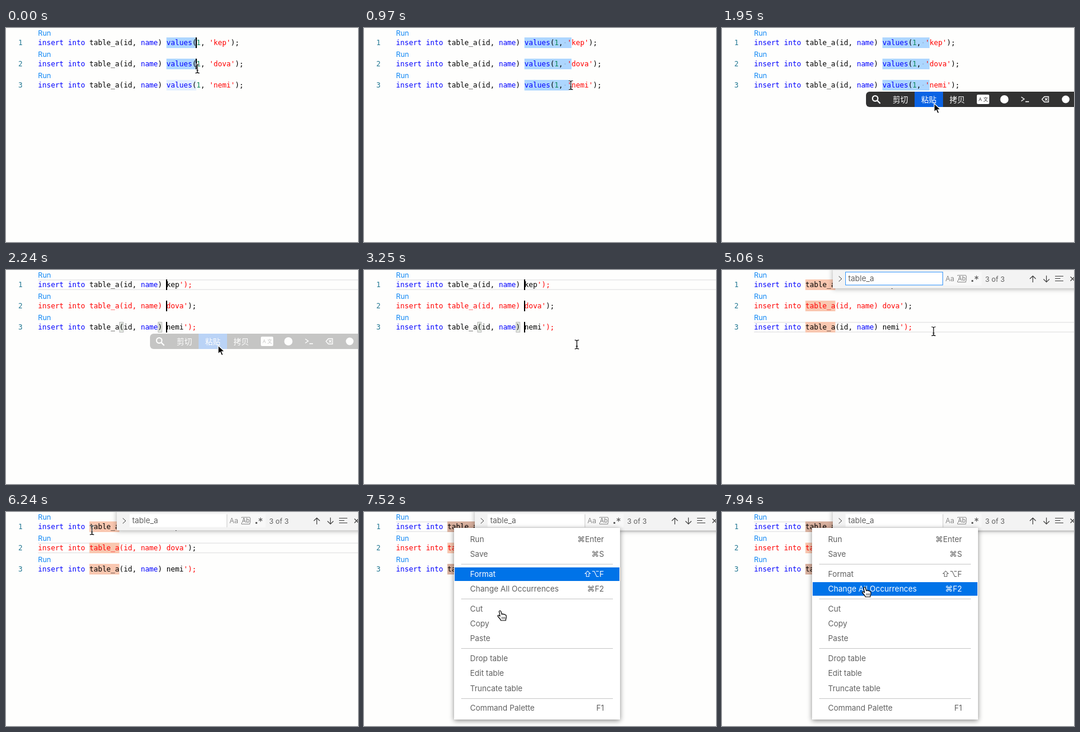
An HTML page for the animation above (8 s loop, 594x363 px).

```html
<!DOCTYPE html>
<html lang="en">
<head>
<meta charset="utf-8">
<title>Column editing in a SQL file</title>
<style>
  html, body { margin: 0; width: 100%; height: 100%; overflow: hidden; background: #fefefd; }
  svg { display: block; width: 594px; height: 363px; }
  text { white-space: pre; font: 13px Inter, 'DejaVu Sans', sans-serif; }
  .code { font: 12px 'DejaVu Sans Mono', monospace; }
  .small { font-size: 12px; }
  .cjk { font: 13px 'Noto Sans CJK SC', 'Noto Sans CJK', sans-serif; }
  .find { filter: drop-shadow(0 1px 4px #0005); }
  .menu { filter: drop-shadow(0 2px 4px #0007); }
</style>
</head>
<body>
<svg id="stage" viewBox="0 0 594 363"></svg>
<script>
const LOOP = 8000, LEFT = 54, CHAR = 7.224;
const BLUE = '#0000ff', RED = '#ff0000', GREEN = '#098658', BLACK = '#000';
const NAMES = ['kep', 'dova', 'nemi'];
const stage = document.getElementById('stage');

// Moments of the story, in ms.
const BAR_IN = 1290, CUT = 2190, CLICK_END = 4080, FIND = 4640,
      CLICK_ROW2 = 5750, CLICK_ROW1 = 6860, MENU = 7130, HOVER_LAG = 170;

// Pointer stops: time, x, y
const PATH = [
  [0, 323, 69], [470, 346, 97], [700, 346, 97], [740, 347, 97], [880, 347, 97], [910, 349, 97],
  [1290, 349, 97], [1440, 358, 128], [3160, 358, 128], [3370, 361, 124], [3550, 361, 124],
  [3800, 490, 265], [4130, 359, 104], [4800, 359, 104], [4910, 357, 104], [5060, 357, 104],
  [5720, 318, 61], [5890, 318, 61], [6230, 145, 31], [6330, 145, 31], [6630, 151, 27],
  [7130, 151, 27], [7520, 229, 167], [7600, 229, 167], [7800, 241, 126], [7910, 241, 126],
  [7940, 240, 127], [8000, 240, 127]
];

// Times at which the text caret is lit
const CARET_ON = [[0, 970], [1440, 1950], [CUT, 2680], [3160, 3660], [CLICK_END, 4580],
                  [CLICK_ROW2, 6230], [CLICK_ROW1, MENU]];

// Menu entries: centre y, label, shortcut
const ITEMS = [
  [46, 'Run', '⌘Enter'], [71, 'Save', '⌘S'],
  [105, 'Format', '⇧⌥F'], [130, 'Change All Occurrences', '⌘F2'],
  [164, 'Cut', ''], [189, 'Copy', ''], [214, 'Paste', ''],
  [248, 'Drop table', ''], [273, 'Edit table', ''], [299, 'Truncate table', ''],
  [332, 'Command Palette', 'F1']
];

const clamp = v => Math.min(1, Math.max(0, v));
const smooth = v => v * v * (3 - 2 * v);
const colX = col => LEFT + col * CHAR;
const rowY = row => 16 + row * 36;

const rect = (x, y, w, h, fill, extra = '') =>
  `<rect x="${x}" y="${y}" width="${w}" height="${h}" fill="${fill}" ${extra}/>`;
const text = (x, y, str, fill, cls = '', anchor = 'start') =>
  `<text x="${x}" y="${y}" fill="${fill}" class="${cls}" text-anchor="${anchor}">${str}</text>`;
const line = (d, color, width = 1) =>
  `<path d="${d}" fill="none" stroke="${color}" stroke-width="${width}"/>`;
const span = (row, from, to, fill) =>
  rect(colX(from), rowY(row), (to - from) * CHAR, 18, fill);

function pointer(t) {
  const i = Math.max(1, PATH.findIndex(p => p[0] >= t));
  const [t0, x0, y0] = PATH[i - 1], [t1, x1, y1] = PATH[i];
  const k = smooth(clamp((t - t0) / (t1 - t0)));
  return { x: x0 + (x1 - x0) * k, y: y0 + (y1 - y0) * k };
}

function tokens(row, cut) {
  const name = NAMES[row];
  if (cut && row === 1) return [[RED, `insert into table_a(id, name) ${name}'`], [BLACK, ');']];
  const head = [[BLUE, 'insert into'], [BLACK, ' table_a(id, '], [BLUE, 'name'], [BLACK, ') ']];
  return head.concat(cut
    ? [[BLACK, name], [RED, "');"]]
    : [[BLUE, 'values'], [BLACK, '('], [GREEN, '1'], [BLACK, ', '], [RED, `'${name}'`], [BLACK, ');']]);
}

function codeRow(row, cut) {
  const y = rowY(row);
  const parts = tokens(row, cut).map(([c, s]) => `<tspan fill="${c}">${s}</tspan>`).join('');
  return text(LEFT, y - 3.5, 'Run', '#0f87f5', 'small') +
    text(28, y + 13, row + 1, '#237893', 'code', 'end') +
    text(LEFT, y + 13, parts, BLACK, 'code');
}

function currentLine(row) {
  const y = rowY(row);
  return rect(LEFT, y, 540, 1.5, '#e8e8e8') + rect(LEFT, y + 16.5, 540, 1.5, '#e8e8e8');
}

function caret(row, col) {
  return rect(Math.round(colX(col)) - 1, rowY(row), 2, 18, BLACK);
}

function editor(t, mouse) {
  const cut = t >= CUT;
  const lit = CARET_ON.some(([a, b]) => t >= a && t < b);
  let under = '', over = '';
  if (!cut) {
    const grip = t < BAR_IN ? mouse : { x: 349, y: 97 };
    const col = Math.round((grip.x - LEFT) / CHAR), rows = grip.y > 79 ? 3 : 2;
    for (let r = 0; r < 3; r++) {
      const picked = r < rows;
      under += span(r, 30, picked ? col : 37, picked ? '#add6ff' : '#e4f0ff');
      if (picked && col >= 40) under += text(colX(39), rowY(r) + 13, '·', '#3333', 'code');
      if (picked && lit) over += caret(r, col);
    }
  } else if (t < CLICK_END) {
    under += currentLine(0);
    for (const col of [19, 28])
      under += rect(colX(col) + .5, 88.5, CHAR - 1, 17, '#e6ebe4', 'stroke="#b9b9b9"');
    if (lit) for (let r = 0; r < 3; r++) over += caret(r, 30);
  } else {
    const [row, col] = t < CLICK_ROW2 ? [2, 37] : t < CLICK_ROW1 ? [1, 37] : [0, 13];
    under += currentLine(row);
    if (lit) over += caret(row, col);
  }
  if (t >= FIND + 60) {
    for (let r = 0; r < 3; r++) {
      under += span(r, 12, 19, '#f9c7b0');
      if (t >= CLICK_ROW1 + 60 && r !== 1) under += span(r, 12, 19, '#57575733');
    }
  }
  return under + [0, 1, 2].map(r => codeRow(r, cut)).join('') + over;
}

function toolbar(t) {
  const alpha = t < 2000 ? clamp((t - BAR_IN) / 150) : clamp((2270 - t) / 110);
  if (!alpha) return '';
  const white = '#fff';
  return `<g opacity="${alpha}">` +
    rect(243, 108, 370, 26, '#323232', 'rx="6"') + rect(325, 108, 48, 26, '#0a63e4') +
    `<circle cx="258.500" cy="119.500" r="4.500" fill="none" stroke="#fff" stroke-width="2"/>` +
    line('M262 123l5 5', white, 2.2) +
    text(288, 126, '剪切', white, 'cjk') + text(336, 126, '粘贴', white, 'cjk') +
    text(384, 126, '拷贝', white, 'cjk') +
    rect(430, 113, 21, 16, white, 'rx="2"') +
    `<g style="font-size:8px">` +
    `<text x="433" y="124" style="font-size:8px" fill="#323232">A</text>` +
    `<text x="441" y="124" class="cjk" style="font-size:8px" fill="#323232">文</text></g>` +
    `<circle cx="476.500" cy="121" r="7" fill="#fff"/>` +
    line('M505 117l5 3.500l-5 3.500M512 125h6', white, 1.3) +
    line('M540 121l4-4.500h7v9h-7zM545 119l4 4M549 119l-4 4', white, 1.3) +
    `<circle cx="580" cy="121" r="6.500" fill="#fff"/></g>`;
}

function findWidget(t) {
  if (t < FIND) return '';
  const drop = -38 * (1 - clamp((t - FIND) / 200)), ink = '#424242', dim = '#8c8c8c';
  const focus = t < CLICK_ROW2 ? 'stroke="#3b99fc"' : '';
  return `<g class="find" transform="translate(0 ${drop})">` +
    rect(187, -4, 420, 35, '#f3f3f3') +
    line('M197 10.500l5 4.500l-5 4.500', ink) +
    rect(374, 3, 64, 23, '#f8f8f8') + rect(208.5, 3.5, 164, 22, '#fff', focus) +
    (focus ? '' : rect(372, 4, 1.5, 22, '#ddd')) +
    text(213, 19, 'table_a', '#616161') +
    text(377, 19, 'Aa', dim, 'small') +
    `<text x="398" y="18" style="font-size:10px" fill="#777">Abl</text>` +
    line('M397.500 10v-1h14v1M397.500 18v2.500h14v-2.500', dim) +
    rect(421, 17, 3, 3, '#666') + line('M429.500 9.500v7M426.500 11.200l6 3.600M432.500 11.200l-6 3.600', '#666', 1.2) +
    text(444, 20, '3 of 3', '#616161', 'small') +
    line('M524.500 21v-11M519.500 15l5-5l5 5M547.500 9.500v11M542.500 15.500l5 5l5-5', ink, 1.2) +
    line('M562 10.500h14M562 14.500h9M562 18.500h14', ink) +
    line('M588 11.500l7 7M595 11.500l-7 7', ink, 1.2) + '</g>';
}

function menu(t) {
  if (t < MENU) return '';
  const hoverY = t - HOVER_LAG < MENU ? 0 : pointer(t - HOVER_LAG).y;
  let out = `<g class="menu">${rect(152, 27, 280, 325, '#fff')}</g>`;
  for (const y of [88, 147, 231, 316]) out += rect(164, y, 256, 1, '#c8c8c8');
  for (const [y, label, keys] of ITEMS) {
    const active = Math.abs(hoverY - y) < 12.6;
    const ink = active ? '#fff' : '#616161';
    if (active) out += rect(153, y - 11, 278, 23, '#0073e8');
    out += text(179, y + 5, label, ink) + text(405, y + 5, keys, ink, '', 'end');
  }
  return out;
}

function cursor(t, { x, y }) {
  const at = shape => `<g transform="translate(${x} ${y})">${shape}</g>`;
  if (t >= MENU && y > 38)
    return at(`<path d="M-1 1.500q1.500-2.500 3 0l1.500 5q2-1.500 3 .3q2-1 2.600 .8q2-.4 2 2v3q-1 2-1 4.400h-8q-1-2.500-4-5.500q-2.500-3-.5-3.500q1.500 0 3 2z"
      fill="#fff" stroke="#000" stroke-width="1.200"/>` + line('M4 11v3.500M6.300 11v3.500M8.600 11v3.500', BLACK, .8));
  if ((t > 1360 && t < 3190) || t >= MENU)
    return at(`<path d="M0 0v14.500l3.400-3.200l2.500 5.600l2.600-1.100l-2.500-5.500h4.800z"
      fill="#000" stroke="#fff" stroke-width="1.200"/>`);
  const beam = 'M-3.500-7.500q3 0 3.500 1.500q.5-1.500 3.500-1.500M0-6v12M-3.500 7.500q3 0 3.500-1.500q.5 1.500 3.500 1.500M-1.500 3h3';
  return at(line(beam, '#fff', 2.6) + line(beam, BLACK, 1.2));
}

function draw(now) {
  const t = now % LOOP, mouse = pointer(t);
  stage.innerHTML = editor(t, mouse) + toolbar(t) + findWidget(t) + menu(t) + cursor(t, mouse);
}

let start;
function tick(now) {
  start ??= now;
  draw(now - start);
  requestAnimationFrame(tick);
}
draw(0);
requestAnimationFrame(tick);
</script>
</body>
</html>
```
